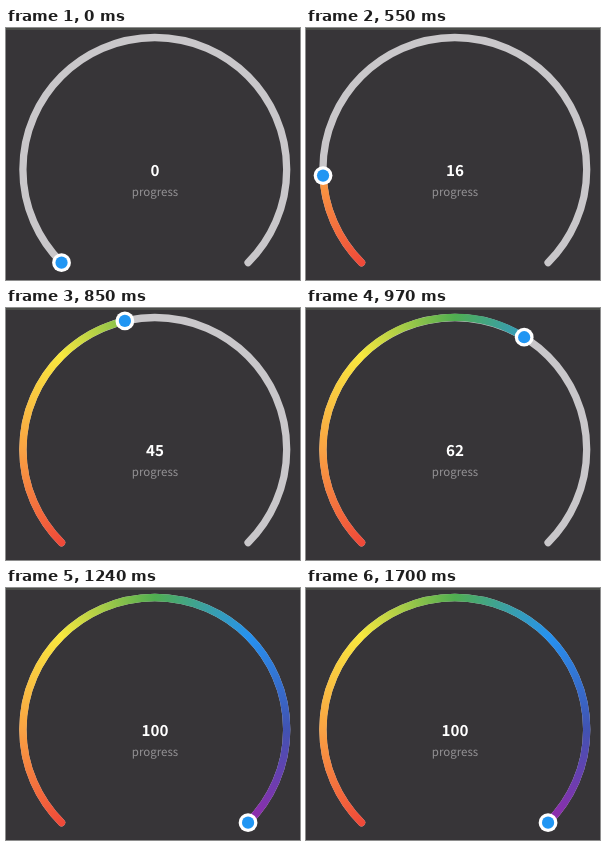
Animation of 294 by 252 pixels, one loop 1790 ms. Source, as an HTML page with a canvas:

```html
<!DOCTYPE html>
<html lang="en">
<head>
<meta charset="utf-8">
<title>Progress ring</title>
<style>
  html, body { margin: 0; width: 100%; height: 100%; overflow: hidden; background: #373538; }
  body { position: relative; }
  canvas, svg { position: absolute; left: 0; top: 0; display: block; }
  text {
    font-family: "Noto Sans CJK SC", "Noto Sans CJK JP", "Noto Sans", sans-serif;
    text-anchor: middle;
    text-rendering: geometricPrecision;
  }
  #value { font-size: 15.2px; font-weight: 700; fill: #fff; }
  #label { font-size: 11.5px; font-weight: 500; fill: #939194; }
</style>
</head>
<body>
<canvas id="ring" width="294" height="252"></canvas>
<svg width="294" height="252">
  <text id="value" x="149" y="147.6">0</text>
  <text id="label" x="149" y="168.2">progress</text>
</svg>
<script>
  const LOOP = 1790;
  const CX = 148.8, CY = 141.4, R = 131.9;
  const START = Math.PI * 0.75, SWEEP = Math.PI * 1.5;
  const COLORS = ['#f04a39', '#faa343', '#f8e83e', '#50ae51', '#2692f0', '#4153b3', '#942aab'];

  // Drag path: [time in ms, progress]
  const PATH = [[165, 0], [360, 0.042], [700, 0.287], [970, 0.616], [1120, 0.907], [1215, 1]];

  const ctx = document.getElementById('ring').getContext('2d');
  const value = document.getElementById('value');

  const rainbow = ctx.createConicGradient(START, CX, CY);
  COLORS.forEach((c, i) => rainbow.addColorStop(0.75 * i / (COLORS.length - 1), c));
  // Solid colours under the round caps
  rainbow.addColorStop(0.875, COLORS[COLORS.length - 1]);
  rainbow.addColorStop(0.875, COLORS[0]);
  rainbow.addColorStop(1, COLORS[0]);

  const slope = i => (PATH[i + 1][1] - PATH[i][1]) / (PATH[i + 1][0] - PATH[i][0]);

  // Harmonic mean of the neighbouring slopes keeps the curve monotone
  function tangent(i) {
    if (i === 0 || i === PATH.length - 1) return 0;
    const a = slope(i - 1), b = slope(i);
    return 2 * a * b / (a + b);
  }

  function progressAt(t) {
    const last = PATH.length - 1;
    if (t <= PATH[0][0]) return 0;
    if (t >= PATH[last][0]) return 1;
    const i = PATH.findIndex(p => p[0] > t) - 1;
    const [t0, p0] = PATH[i], [t1, p1] = PATH[i + 1];
    const h = t1 - t0, u = (t - t0) / h, v = 1 - u;
    return p0 * (1 + 2 * u) * v * v + p1 * u * u * (3 - 2 * u)
      + h * u * v * (tangent(i) * v - tangent(i + 1) * u);
  }

  function arc(style, amount) {
    ctx.beginPath();
    ctx.arc(CX, CY, R, START, START + SWEEP * amount);
    ctx.strokeStyle = style;
    ctx.stroke();
  }

  function dot(x, y, r, color) {
    ctx.beginPath();
    ctx.arc(x, y, r, 0, Math.PI * 2);
    ctx.fillStyle = color;
    ctx.fill();
  }

  function draw() {
    const p = progressAt(performance.now() % LOOP);
    const angle = START + SWEEP * p;
    const x = CX + R * Math.cos(angle), y = CY + R * Math.sin(angle);

    ctx.fillStyle = '#373538';
    ctx.fillRect(0, 0, 294, 252);
    ctx.fillStyle = '#4b4d49';
    ctx.fillRect(0, 0, 294, 2);

    ctx.lineWidth = 7.3;
    ctx.lineCap = 'round';
    arc('#c9c7ca', 1);
    if (p > 0) arc(rainbow, p);
    dot(x, y, 9.4, '#fff');
    dot(x, y, 6.1, '#2196f3');

    value.textContent = Math.round(p * 100);
    requestAnimationFrame(draw);
  }
  draw();
</script>
</body>
</html>
```
